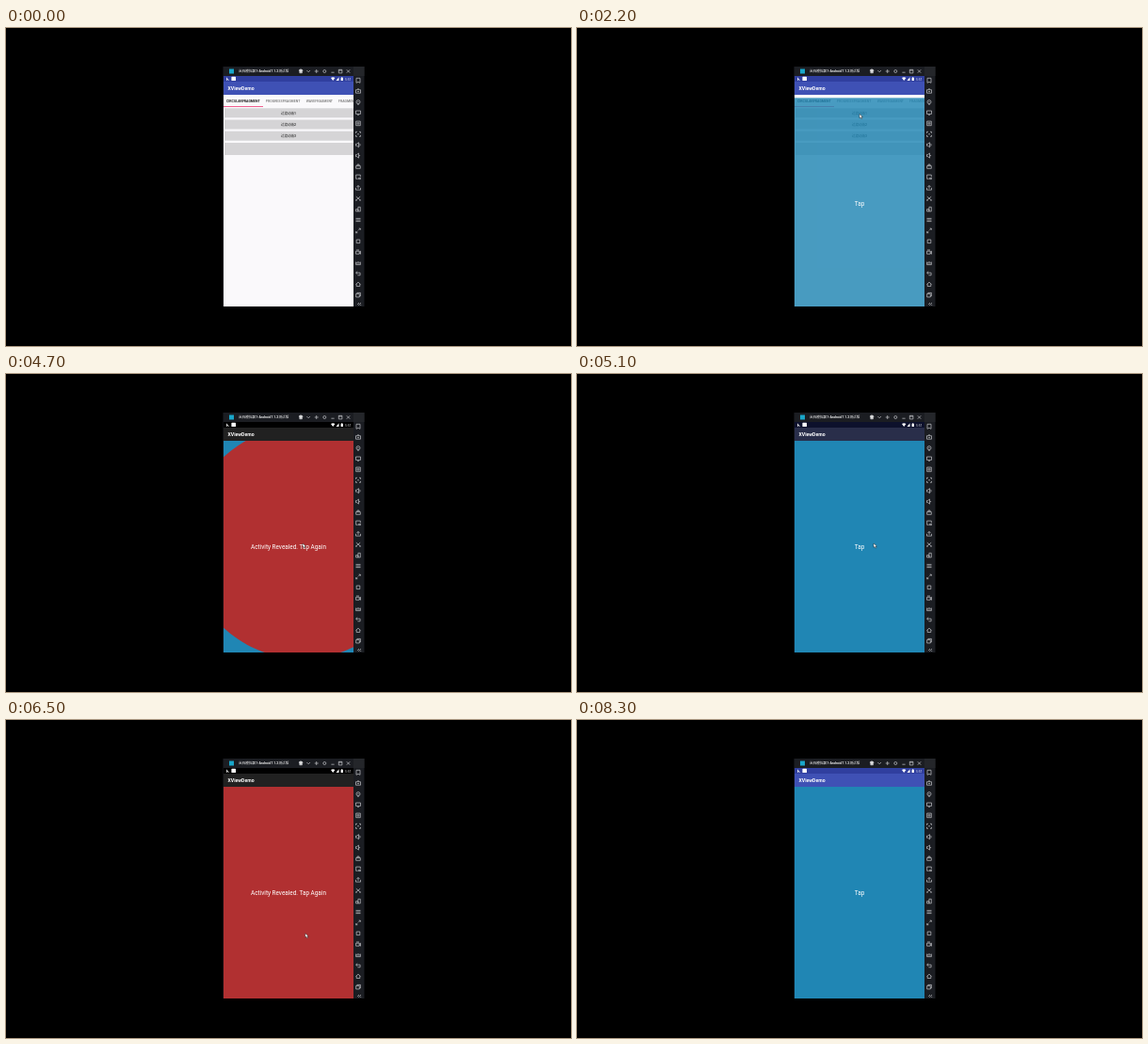
An HTML page that plays this animation: 600 px wide and 338 px high, repeating every 8500 ms.

```html
<!DOCTYPE html>
<html lang="en">
<head>
<meta charset="utf-8">
<title>Circular reveal demo</title>
<style>
  html, body { margin: 0; width: 100%; height: 100%; overflow: hidden; background: #000; }
  svg { display: block; width: 100vw; height: 100vh; }
  text { font-family: Roboto, "Noto Sans CJK SC", "Noto Sans CJK", sans-serif; fill: #fff; }
  .mid { text-anchor: middle; }
  .big { font-size: 6.4px; }
  .tab { font-size: 3.55px; font-weight: 500; fill: #777; }
  .button { font-size: 3.5px; font-weight: 500; fill: #222; }
  .line { fill: none; stroke: #c4c6ca; stroke-width: .7; }
</style>
</head>
<body>
<svg viewBox="0 0 600 338">
  <defs>
    <clipPath id="screen"><rect x="231" y="51" width="138" height="245"/></clipPath>
    <clipPath id="content"><rect x="231" y="71" width="138" height="225"/></clipPath>
    <clipPath id="hole"><circle id="circle"/></clipPath>
  </defs>
  <rect width="600" height="338"/>
  <rect x="230.5" y="41" width="150" height="255" fill="#1b1d22"/>
  <rect x="369" y="41" width="11.5" height="10" fill="#24262a"/>

  <!-- window title bar -->
  <rect x="237" y="43.5" width="5" height="5" fill="#19a6c9"/>
  <text x="247" y="47.4" font-size="3.65" font-weight="500">岚石模拟器1-Android7.1.2测试版</text>
  <g class="line">
    <path fill="#ddd" d="M311 45l1.3-1h1.6l1.3 1-.8 1v1.8h-2.6V46z"/>
    <path d="M319.4 45l1.8 1.8 1.8-1.8M327.7 46h4M329.7 44v4M345.4 47.2h3.2M353.3 44.3h3.6v3.6h-3.6zM353.3 45h3.6M361.8 44.3l3.4 3.4M365.2 44.3l-3.4 3.4"/>
    <circle cx="338.3" cy="46" r="1.5"/>
  </g>

  <!-- phone screen -->
  <g clip-path="url(#screen)">
    <rect x="231" y="71" width="138" height="225" fill="#faf9fb"/>
    <g id="list">
      <text class="tab" x="234" y="78.8" style="fill:#222;font-weight:700">CIRCULARFRAGMENT</text>
      <text class="tab" x="275.8" y="78.8">PROGRESSFRAGMENT</text>
      <text class="tab" x="318.8" y="78.8">WAVEFRAGMENT</text>
      <text class="tab" x="353" y="78.8">FRAGMENT</text>
      <rect x="231" y="83" width="42" height="1" fill="#f0608f"/>
      <g fill="#d5d4d6">
        <rect x="232" y="85.3" width="137" height="10"/>
        <rect x="232" y="97.5" width="137" height="10"/>
        <rect x="232" y="109.7" width="137" height="10"/>
        <rect x="232" y="122" width="137" height="13"/>
      </g>
      <rect id="ripple" y="85.8" height="9" fill="#c9c8ca"/>
      <text class="button mid" x="300" y="91.5">过渡动画1</text>
      <text class="button mid" x="300" y="103.7">过渡动画2</text>
      <text class="button mid" x="300" y="115.9">过渡动画3</text>
    </g>
    <g id="page">
      <rect x="231" y="71" width="138" height="245" fill="#2086b4"/>
      <text class="big mid" x="300" y="186">Tap</text>
    </g>
    <g clip-path="url(#content)">
      <g clip-path="url(#hole)">
        <rect x="231" y="71" width="138" height="225" fill="#b13031"/>
        <text class="big mid" x="300" y="186">Activity Revealed. Tap Again</text>
      </g>
    </g>
    <rect x="231" y="51" width="138" height="6" fill="#303f9f"/>
    <rect x="231" y="57" width="138" height="14" fill="#3f51b5"/>
    <g id="darkBars">
      <rect x="231" y="51" width="138" height="6"/>
      <rect x="231" y="57" width="138" height="14" fill="#212121"/>
    </g>
    <text x="235.5" y="66.1" font-size="5.15" font-weight="700">XViewDemo</text>
    <g fill="#fff">
      <path d="M234 52.3l3.2 3.5h-1l-1-1v1h-1.2z" opacity=".8"/>
      <rect x="239.4" y="51.8" width="4.6" height="4.3" rx=".6"/>
      <path d="M345 53q2.2-1.6 4.4 0l-2.2 3zM350.5 56l3-3.7v3.7zM355.6 52.7h.6v-.5h1v.5h.7v3.4h-2.3z"/>
    </g>
    <text x="360" y="55.5" font-size="3.4" opacity=".85">5:51</text>
  </g>

  <rect id="hover" x="369.3" y="257" width="9.5" height="8.5" fill="#55585d"/>
  <g id="tools" class="line"></g>
  <path id="cursor" d="M0 0v4.3l1.1-.9.8 1.7.9-.4-.8-1.7h1.4z" fill="#fff" stroke="#222" stroke-width=".45"/>
</svg>
<script>
const $ = id => document.getElementById(id);
const LOOP = 8500, STEP = 100, SPAN = 600, MAX_RADIUS = 264;

// Toolbar icons, each drawn around its own centre
const icons = [
  'M-2-2.5h4v5l-2-1-2 1z', 'M-2.5-1.5h5v3.5h-5zM-1-2.3h2M-1 .4h2', 'M-2 0a2 2 0 1 0 4 0a2 2 0 1 0-4 0M-.6 0h1.2M-1 2.5h2',
  'M-2.5-2h5v3.4h-5zM-1 2.3h2', 'M-2.3-2.3h4.6v4.6h-4.6zM-1-1v2M0-1.4v2.8M1-1v2', 'M-2.5-1v-1.5h1.5M1-2.5h1.5v1.5M2.5 1v1.5H1M-1 2.5h-1.5V1M-1 0h2',
  'M-2.5-1h1l2-1.5v5l-2-1.5h-1zM1.6-1.4q1 1.4 0 2.8', 'M-2.5-1h1l2-1.5v5l-2-1.5h-1zM1.6-.6v1.2', 'M-2.3-.4h4.6v2.7h-4.6zM-1.2-.4v-1.3h2.4v1.3M0-2.6v1',
  'M-2.3-2.3h4.6v2.2M-2.3-2.3v4.2h2M.5 1h2v1.2h-2z', 'M-2.5 0v2.3h5V0M0 1v-3.3M-1.5-.8L0-2.3l1.5 1.5', 'M-2.2-2L2 1.6M2.2-2L-2 1.6M-2.4 1.2v1h1M2.4 1.2v1h-1',
  'M-2.4 0h2.3v2.3h-2.3zM-.1-2.3h2.4v4.6h-2.4z', 'M-2.5-1.6h5M-2.5 0h5M-2.5 1.6h5', 'M.5-.5l1.8-1.8M.7-2.3h1.6v1.6M-.5.5l-1.8 1.8M-.7 2.3h-1.6V.7',
  'M-1.8-1.8h3.6v3.6h-3.6z', 'M-2.4-1h3.6v3h-3.6zM1.2 0l1.3-1v3l-1.3-1M-2-2.2h3', 'M-2.4-1v3h4.8v-3M-1.2-.8v1.8M0-1.6v2.6M1.2-.8v1.8',
  'M-.8-2.3l-1.6 1.5 1.6 1.5M-2.2-.8h4.3v2.6H-.5', 'M-2.5 0L0-2.2 2.5 0M-1.8-.4v2.5h3.6v-2.5', 'M-2.3-1.2h3.6v3.4h-3.6zM-1.2-1.2v-1.2h3.6v3.6H1.3',
];
$('tools').innerHTML = icons.map((d, i) =>
  `<path transform="translate(374 ${55.8 + i * 11.4})" d="${d}"/>`).join('') +
  '<path d="M375 292l-1.4 1.4 1.4 1.4M377 292l-1.4 1.4 1.4 1.4"/>';

// start, centre x, centre y, direction
const reveals = [
  [3414, 315, 179, 1], [4388, 315, 179, -1],
  [5951, 272, 154, 1], [6702, 328, 242, -1],
];

// time, x, y
const cursorPath = [
  [300, 362, 138], [1100, 300, 91.5], [2300, 300, 91.5], [2700, 315, 180],
  [5500, 315, 180], [5900, 272, 154], [6000, 272, 154], [6100, 277, 166],
  [6600, 328, 242], [6800, 328, 242], [7100, 370, 261], [7300, 377, 263],
];

const clamp = v => Math.min(1, Math.max(0, v));
const progress = (t, start, length) => clamp((t - start) / length);
const set = (id, attrs) => {
  for (const name in attrs) $(id).setAttribute(name, attrs[name]);
};

function cursorAt(t) {
  const i = cursorPath.findIndex(p => p[0] > t);
  if (i < 1) return null;
  const [t0, x0, y0] = cursorPath[i - 1], [t1, x1, y1] = cursorPath[i];
  const k = (t - t0) / (t1 - t0);
  return [x0 + (x1 - x0) * k, y0 + (y1 - y0) * k];
}

function render(t) {
  const ripple = t >= 1900 ? Math.min(68, (t - 1800) / 4) : 0;
  set('ripple', { x: 300 - ripple, width: ripple * 2 });

  const open = 1 - (1 - progress(t, 2000, 350)) ** 2;
  set('page', { opacity: open, transform: `translate(0 ${18 * (1 - open)})` });

  const reveal = reveals.filter(r => r[0] <= t).pop();
  let radius = 0, dark = 0;
  if (reveal) {
    const [start, cx, cy, direction] = reveal;
    const wave = Math.cos(Math.PI * progress(t, start, SPAN));
    radius = MAX_RADIUS * (1 - direction * wave) / 2;
    dark = direction > 0 ? 1 : 1 - progress(t, start + SPAN, 400);
    set('circle', { cx, cy });
  }
  set('circle', { r: radius });
  set('darkBars', { opacity: dark });

  const cursor = cursorAt(t);
  set('cursor', {
    visibility: cursor ? 'visible' : 'hidden',
    transform: `translate(${cursor || '0 0'})`,
  });
  set('hover', { visibility: t >= 7100 && t < 7300 ? 'visible' : 'hidden' });
}

const origin = performance.now();
function tick(now) {
  const t = Math.max(0, now - origin) % LOOP;
  render(Math.floor(t / STEP) * STEP);
  requestAnimationFrame(tick);
}
render(0);
requestAnimationFrame(tick);
</script>
</body>
</html>
```
